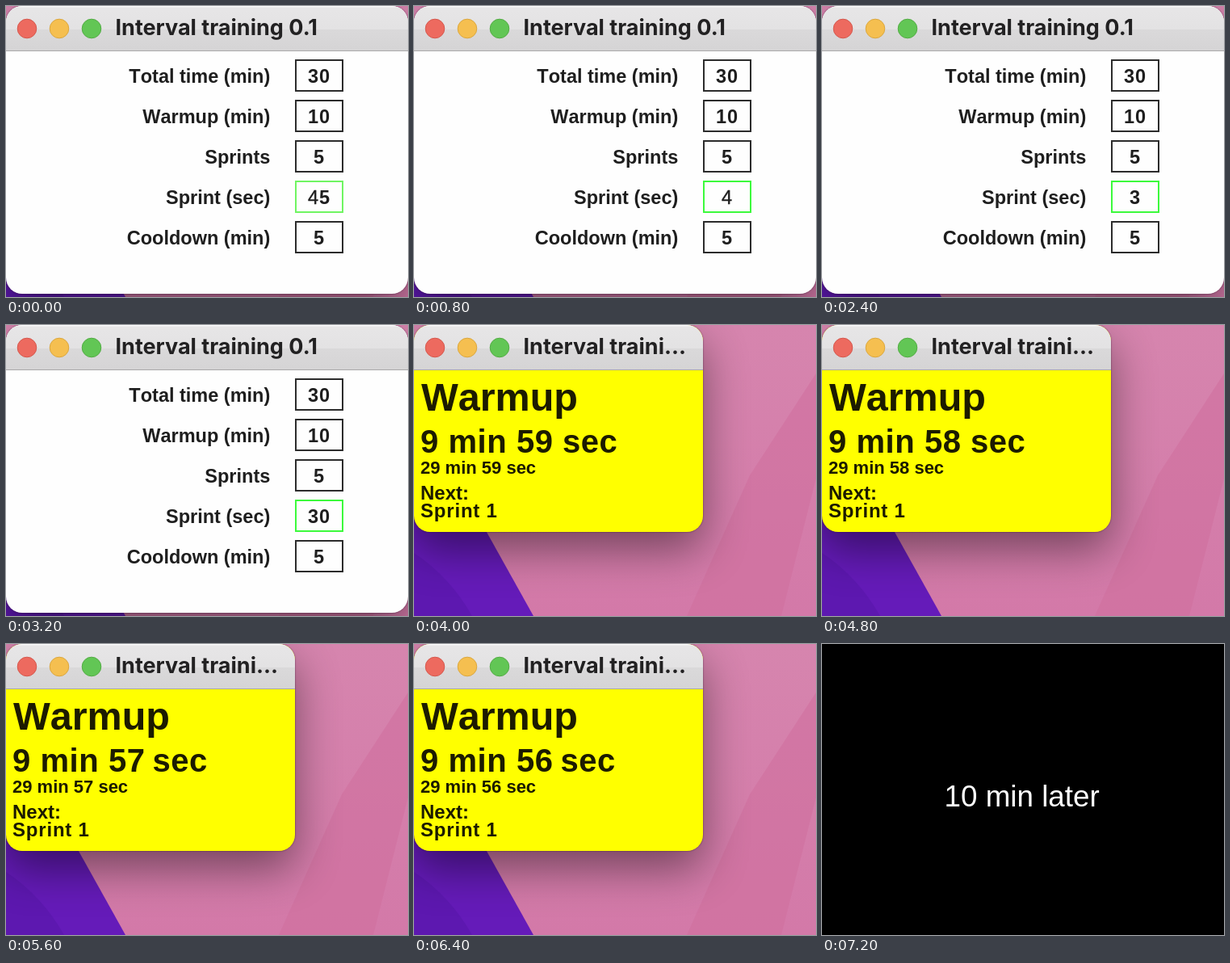
These frames come from a looping animation (498 px wide and 360 px high, 8000 ms). An HTML page:

```html
<!DOCTYPE html>
<html lang="en">
<head>
<meta charset="utf-8">
<title>Interval training</title>
<style>
html, body { margin: 0; width: 100%; height: 100%; overflow: hidden; }
.stage { position: relative; width: 498px; height: 360px; overflow: hidden; background: #d47ca9; }
svg { position: absolute; left: 0; top: 0; }

.win {
  position: absolute; left: 0; top: 0; overflow: hidden; border-radius: 20px;
  box-shadow: 0 0 1px 1px rgba(60, 20, 50, .25), 0 22px 54px rgba(0, 0, 0, .45);
  animation: resize 8s step-end infinite;
}
.bar {
  height: 55px; border-bottom: 1px solid #a9a8a9;
  box-shadow: inset 0 1.5px #fafafa;
  background: linear-gradient(#e7e6e7, #e3e2e3 52%, #dad9da 52%, #d5d4d5);
}
text { font-family: "Liberation Sans", Arial, sans-serif; font-kerning: none; white-space: pre; }
.title { font: 700 27px Inter, sans-serif; font-kerning: auto; fill: #222122; }
.soft { filter: blur(.45px); }
.form { font-size: 23.5px; font-weight: bold; fill: #1e1e1e; }
.label { text-anchor: end; }
.value { text-anchor: middle; letter-spacing: 1px; }
.thin { font-weight: 400; stroke: #1e1e1e; stroke-width: .4px; }
.box { fill: none; stroke: #2c2c2c; stroke-width: 2px; }
.active { animation: focus 8s step-end infinite; }
.timer { font-weight: bold; fill: #1c1b00; }
.big { font-size: 40px; letter-spacing: .55px; }
.small { font-size: 22px; }
.next { font-size: 24px; }

.first { animation: first 8s step-end infinite; }
.second { animation: second 8s step-end infinite; }
.slot { visibility: hidden; animation: slot 8s step-end calc(var(--i) * .8s - 8s) infinite; }

@keyframes resize {
  0% { width: 498px; height: 356px; background: #fefefe; }
  50%, to { width: 358px; height: 256px; background: #ff0; }
}
@keyframes focus { 0% { stroke: #70f562; } 10%, to { stroke: #3cfa3c; } }
@keyframes first { 0% { visibility: visible; } 50%, to { visibility: hidden; } }
@keyframes second { 0% { visibility: hidden; } 50% { visibility: visible; } 90%, to { visibility: hidden; } }
@keyframes slot { 0% { visibility: visible; } 10%, to { visibility: hidden; } }
</style>
</head>
<body>
<div class="stage">
  <svg width="498" height="360">
    <defs>
      <linearGradient id="sky" x1="0" y1="0" x2="0" y2="1">
        <stop offset="0" stop-color="#d685ae"/>
        <stop offset="1" stop-color="#d379a8"/>
      </linearGradient>
    </defs>
    <path fill="url(#sky)" d="M0 0H498V360H0z"/>
    <path fill="#d0709f" opacity=".6" d="M416 186L338 360H455L498 190V60z"/>
    <path fill="#651bb9" d="M0 95L148 360H0z"/>
    <path fill="#5d18b0" d="M0 282Q45 312 72 360H0z"/>
  </svg>

  <div class="win"><div class="bar"></div></div>

  <svg width="498" height="360">
    <g stroke-width="1">
      <circle cx="26" cy="28" r="11.8" fill="#ed6a5f" stroke="#d5574c"/>
      <circle cx="66" cy="28" r="11.8" fill="#f5bf50" stroke="#dba73d"/>
      <circle cx="106" cy="28" r="11.8" fill="#62c655" stroke="#52ac43"/>
    </g>
    <g class="first">
      <text class="title" x="135.5" y="36">Interval training 0.1</text>
      <g class="form soft" id="rows"></g>
    </g>
    <g class="second">
      <text class="title" x="135.5" y="36">Interval traini...</text>
      <g class="timer soft">
        <text x="9" y="106" font-size="48.5">Warmup</text>
        <g id="clock"></g>
        <text class="next" x="8" y="216">Next:</text>
        <text class="next" x="8" y="238" letter-spacing=".8">Sprint 1</text>
      </g>
    </g>
    <g class="slot" style="--i:9">
      <path d="M0 0H498V360H0z"/>
      <text x="151.5" y="201" font-size="36.8" fill="#fff">10 min later</text>
    </g>
  </svg>
</div>

<script>
const slot = (i, body) => `<g class="slot" style="--i:${i}">${body}</g>`;
const value = (body, y) => `<text class="value" x="388" y="${y}">${body}</text>`;

const four = '<tspan class="thin">4</tspan>';
const typed = [four + '5', four, '', '3', '30'];
const fields = [
  ['Total time (min)', 30],
  ['Warmup (min)', 10],
  ['Sprints', 5],
  ['Sprint (sec)', null],
  ['Cooldown (min)', 5]
];

document.getElementById('rows').innerHTML = fields.map(([label, n], row) => {
  const y = 66 + row * 50;
  const edited = n === null;
  const content = edited
    ? typed.map((s, i) => slot(i, value(s, y + 28.5))).join('')
    : value(n, y + 28.5);
  return `<text class="label" x="327.3" y="${y + 29.3}">${label}</text>
    <rect class="box${edited ? ' active' : ''}" x="359" y="${y + 1}" width="58" height="38"/>${content}`;
}).join('');

document.getElementById('clock').innerHTML = [59, 58, 57, 56].map((sec, i) => slot(5 + i,
  `<text class="big" x="8" y="158">9 min ${sec}</text>
   <text class="big" x="${sec > 57 ? 184 : 181.5}" y="158">sec</text>
   <text class="small" x="8" y="184">29 min ${sec} sec</text>`)).join('');
</script>
</body>
</html>
```
